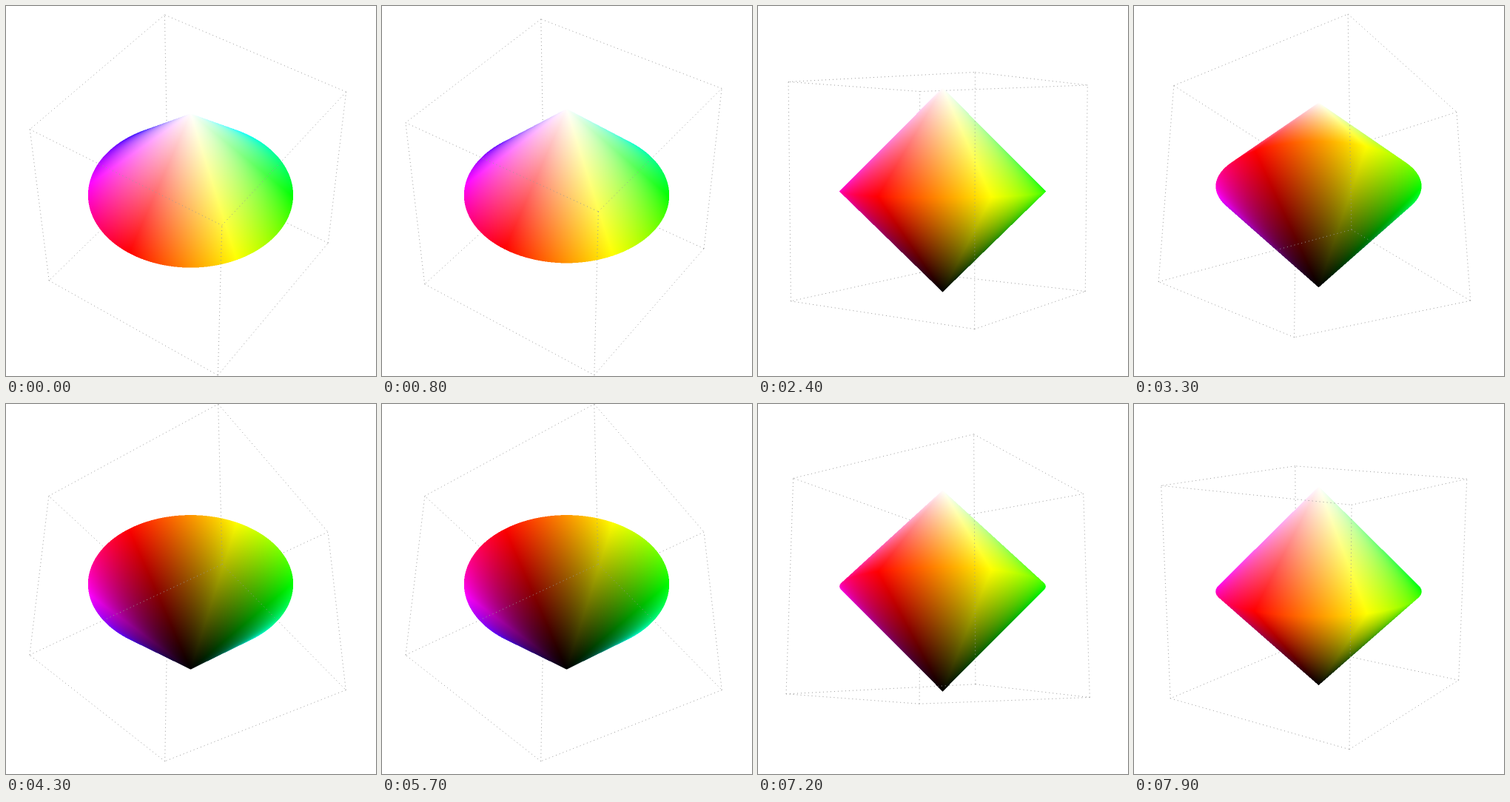
Animation, 500 px wide and 500 px high, one loop 8000 ms. Source, as an HTML page with a canvas:

```html
<!DOCTYPE html>
<html lang="en">
<head>
<meta charset="utf-8">
<title>HSL bicone</title>
<style>
html, body { margin: 0; width: 100%; height: 100%; overflow: hidden; background: #fff; }
canvas { display: block; width: 500px; height: 500px; }
</style>
</head>
<body>
<canvas id="stage" width="500" height="500"></canvas>
<script>
const ctx = document.getElementById('stage').getContext('2d');

const LOOP = 8000, STEP = 100, SWING = 10000;
const MID = 249.5;
const SCALE = 143.9;               // pixels per box half-side at the centre
const DIST = 8;                    // horizontal camera distance
const R = 1 / 1.04;                // bicone radius and half-height
const TURN = 34.82 * Math.PI / 180;

// The bicone is traced at double resolution and scaled down for smooth edges.
const FINE = 2, HALF = 144, N = HALF * 2 * FINE;
const solid = document.createElement('canvas');
solid.width = solid.height = N;
const solidCtx = solid.getContext('2d');
const image = solidCtx.createImageData(N, N);

function camera(t) {
  const z = DIST * Math.cos(2 * Math.PI * t / SWING);
  const d = Math.hypot(DIST, z);
  return { z, d, sin: z / d, cos: DIST / d, focal: SCALE * d };
}

function project(cam, [x, q, h]) {
  const k = cam.focal / (cam.d - q * cam.cos - h * cam.sin);
  return [MID + x * k, MID - (h * cam.cos - q * cam.sin) * k];
}

function corner(i, h) {
  const a = (45 + 90 * i) * Math.PI / 180 - TURN;
  return [Math.SQRT2 * Math.sin(a), Math.SQRT2 * Math.cos(a), h];
}

const edges = [];
for (let i = 0; i < 4; i++) {
  edges.push([corner(i, -1), corner(i, 1)]);
  for (const h of [-1, 1]) edges.push([corner(i, h), corner(i + 1, h)]);
}

function drawEdges(cam, front) {
  ctx.strokeStyle = '#999';
  ctx.lineWidth = 1;
  ctx.setLineDash([1, 4]);
  for (const [a, b] of edges) {
    if ((a[1] + b[1] > 0) !== front) continue;
    ctx.beginPath();
    ctx.moveTo(...project(cam, a));
    ctx.lineTo(...project(cam, b));
    ctx.stroke();
  }
}

// Nearest hit of a ray with the upper (side 1) or lower (side -1) cone.
function hitCone(cam, vx, vq, vh, side) {
  const w = cam.z - side * R;
  const a = vx * vx + vq * vq - vh * vh;
  const b = DIST * vq - w * vh;
  const disc = b * b - a * (DIST * DIST - w * w);
  if (disc < 0) return Infinity;
  const root = Math.sqrt(disc);
  let best = Infinity;
  for (const s of [-1, 1]) {
    const t = (-b + s * root) / a;
    const h = (cam.z + t * vh) * side;
    if (t > 0 && t < best && h >= 0 && h <= R) best = t;
  }
  return best;
}

function channel(hue, shift, light) {
  const k = Math.min(1, Math.max(0, Math.abs((hue + shift) % 6 - 3) - 1));
  return 255 * (light > 0 ? k + (1 - k) * light : k * (1 + light));
}

function drawBicone(cam) {
  const px = image.data;
  px.fill(0);
  for (let j = 0; j < N; j++) {
    const v = (HALF - (j + 0.5) / FINE) / cam.focal;
    const vq = -v * cam.sin - cam.cos;
    const vh = v * cam.cos - cam.sin;
    for (let i = 0; i < N; i++) {
      const vx = ((i + 0.5) / FINE - HALF) / cam.focal;
      const t = Math.min(hitCone(cam, vx, vq, vh, 1), hitCone(cam, vx, vq, vh, -1));
      if (t === Infinity) continue;
      const angle = Math.atan2(t * vx, DIST + t * vq) + TURN;
      const hue = (angle * 3 / Math.PI + 6) % 6;
      const light = (cam.z + t * vh) / R;
      const o = (j * N + i) * 4;
      px[o] = channel(hue, 0, light);
      px[o + 1] = channel(hue, 4, light);
      px[o + 2] = channel(hue, 2, light);
      px[o + 3] = 255;
    }
  }
  solidCtx.putImageData(image, 0, 0);
  ctx.drawImage(solid, MID - HALF, MID - HALF, HALF * 2, HALF * 2);
}

function draw(t) {
  const cam = camera(t);
  ctx.fillStyle = '#fff';
  ctx.fillRect(0, 0, 500, 500);
  drawEdges(cam, false);
  drawBicone(cam);
  drawEdges(cam, true);
}

const start = performance.now();
let shown = -1;
function tick() {
  const elapsed = Math.max(0, performance.now() - start);
  const t = Math.floor(elapsed % LOOP / STEP) * STEP;
  if (t !== shown) draw(shown = t);
  requestAnimationFrame(tick);
}
tick();
</script>
</body>
</html>
```
